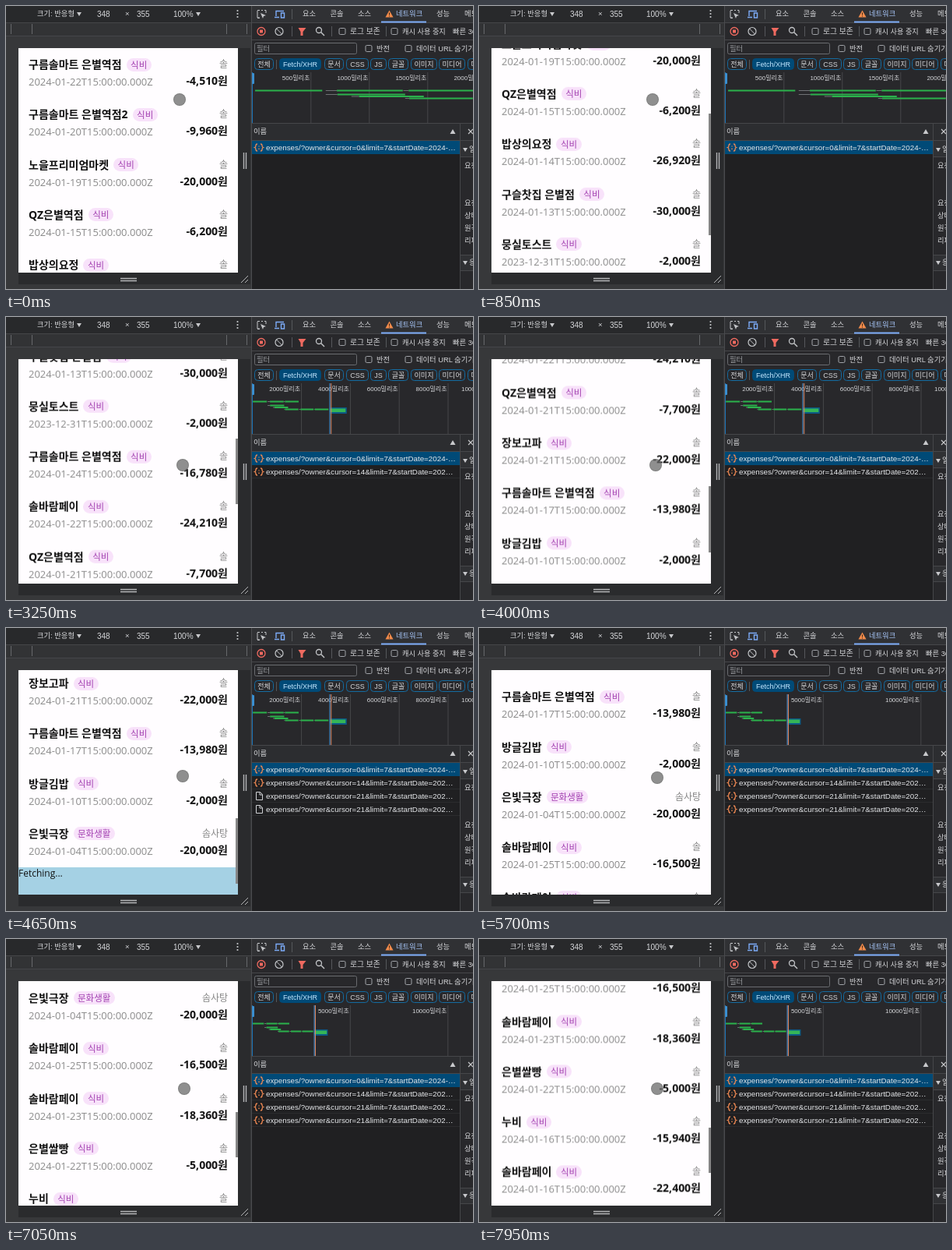
Recreate the animation shown at these times as an HTML page. Size 600x363 px, loop 8 s.

```html
<!DOCTYPE html>
<html lang="ko">
<head>
<meta charset="utf-8">
<title>Expense list</title>
<style>
html, body { margin: 0; width: 100%; height: 100%; overflow: hidden; background: #28282a; }
#stage { position: relative; width: 600px; height: 363px; overflow: hidden; }
svg { position: absolute; inset: 0; }
svg text { font-family: "Liberation Sans", "Noto Sans CJK KR", "Noto Sans CJK JP", sans-serif; white-space: pre; }
#page { position: absolute; left: 16px; top: 54px; width: 282px; height: 288px; overflow: hidden;
  background: #fffdff; font: 13px/20px "Open Sans", "Noto Sans CJK KR", "Noto Sans CJK JP", sans-serif; }
#list { position: absolute; inset: 0; will-change: transform; }
.item { position: absolute; left: 13px; width: 256px; height: 64px; white-space: nowrap; }
.item > * { position: absolute; }
.name { left: 0; top: 11px; display: flex; align-items: center; font-size: 14px; font-weight: 700; color: #111; }
.tag { margin-left: 6px; padding: 0 5.5px; border-radius: 9px; background: #f8e2fa;
  font-size: 11.5px; line-height: 17px; font-weight: 400; color: #a23fb0; }
.owner { right: 0; top: 11px; font-size: 12px; color: #858585; }
.date { left: 0; top: 33px; color: #8a8a8a; }
.sum { right: 0; top: 32px; font-size: 14px; font-weight: 700; color: #111; }
#more { position: absolute; left: 0; width: 282px; height: 82px; background: #a5d1e4; color: #111;
  font-size: 12px; line-height: 15px; }
#thumb { position: absolute; right: 0; width: 3.5px; background: #858585; }
#cursor { position: absolute; left: -8px; top: -8px; width: 16px; height: 16px; border-radius: 50%;
  box-sizing: border-box; background: rgba(105,105,105,.74); border: 1px solid rgba(95,95,95,.35); }
</style>
</head>
<body>
<div id="stage">
  <svg id="chrome" width="600" height="363"></svg>
  <div id="page"><div id="list"><div id="more">Fetching...</div></div><div id="thumb"></div></div>
  <div id="cursor"></div>
</div>
<script>
const LOOP = 8000, ROW = 64.3, VIEW = 288, FOOT = 82;
const byId = id => document.getElementById(id);
const chrome = byId('chrome');

// SVG helpers
function add(tag, attrs, parent = chrome) {
  const el = document.createElementNS('http://www.w3.org/2000/svg', tag);
  for (const key in attrs) el.setAttribute(key, attrs[key]);
  return parent.appendChild(el);
}
const group = () => add('g', {});
const rect = (x, y, width, height, fill, parent, more) => add('rect', { x, y, width, height, fill, ...more }, parent);
const line = (d, stroke, parent, width = 1) => add('path', { d, stroke, fill: 'none', 'stroke-width': width }, parent);
function text(x, cy, value, { size = 9.3, fill = '#d6d7da', anchor = 'start', parent } = {}) {
  add('text', { x, y: cy + size * .36, 'font-size': size, fill, 'text-anchor': anchor }, parent).textContent = value;
}
function checkbox(x, y, label, size) {
  rect(x - 4, y - 4, 8, 8, 'none', chrome, { rx: 1.5, stroke: '#a0a3a8' });
  text(x + 10, y, label, { size });
}
const arrow = (x, y) => add('path', { d: `M${x - 3} ${y - 2}h6l-3 5z`, fill: '#c8c9cc' });

function drawDevice() {
  rect(0, 0, 315, 363, '#37383a');
  rect(0, 0, 315, 21, '#28292b');
  rect(0, 21, 315, 17, '#323335');
  line('M0 21.5H315M0 38.5H315', '#454649');
  line('M6.5 23V36M33.5 23V36M283.5 23V36M309.5 23V36', '#66686b');
  rect(16, 342, 298, 15, '#2a2b2d');
  rect(298, 54, 16, 303, '#2a2b2d');
  line('M305.5 188V209M308.5 188V209M147 349.5H168M147 352.5H168', '#b5b6b8', chrome, 1.4);
  line('M302 355L311 346M307 355L311 351', '#b5b6b8');
  text(40, 10, '크기: 반응형');
  arrow(94, 10);
  text(117, 10, '348', { size: 10 });
  text(153, 10, '×', { size: 9.5 });
  text(168, 10, '355', { size: 10 });
  text(215, 10, '100%', { size: 10 });
  arrow(247, 10);
  for (const y of [6, 10, 14]) add('circle', { cx: 297.5, cy: y, r: 1.1, fill: '#c8c9cc' });
}

function drawTools() {
  rect(315, 0, 285, 363, '#28282b');
  rect(315, 0, 285, 21, '#303134');
  rect(315, 0, 1, 363, '#4a4b4e');
  line('M316 21.5H600M316 43.5H600M316 150.5H600', '#46474a');
  line('M367.5 4V17M367.5 26V39M418.5 26V39M488.5 26V39M347.5 69V81', '#55575b');

  // tab bar
  line('M326 15h-3V6M323 5.500h3M328 5.500h2M332 5.500h2V9M323 15.500h3', '#c3c5c8');
  add('path', { d: 'M327 9l7 3-3 1-1 3z', fill: '#c3c5c8' });
  line('M347 13V6.500H357M345 14.500H351M353.500 9h4v6h-4z', '#7cacf8', chrome, 1.4);
  ['요소', '콘솔', '소스'].forEach((name, i) => text(381 + 35.5 * i, 10, name));
  add('path', { d: 'M492.500 5.500l5 9h-10z', fill: '#f28b4b' });
  line('M492.500 8.500v3M492.500 12.500v1', '#3a2414');
  text(501, 10, '네트워크', { fill: '#a8c7fa' });
  rect(482, 19.5, 58, 2, '#7cacf8');
  text(553, 10, '성능');
  text(589, 10, '메모리');

  // recording bar
  add('circle', { cx: 328, cy: 32.5, r: 5, fill: 'none', stroke: '#ef6a60', 'stroke-width': 1.3 });
  rect(326, 30.5, 4, 4, '#ef6a60');
  add('circle', { cx: 351, cy: 32.5, r: 5, fill: 'none', stroke: '#c3c5c8', 'stroke-width': 1.2 });
  line('M347.500 29L354.500 36', '#c3c5c8');
  add('path', { d: 'M375.500 28h10l-4 5v5h-3v-5z', fill: '#ef6a60' });
  add('circle', { cx: 402, cy: 31, r: 3.5, fill: 'none', stroke: '#c3c5c8', 'stroke-width': 1.3 });
  line('M404.500 33.500l4.500 4.500', '#c3c5c8', chrome, 1.4);
  checkbox(432, 32.5, '로그 보존', 9.8);
  checkbox(499, 32.5, '캐시 사용 중지', 9.2);
  text(574, 32.5, '빠른 3G');

  // filter bar
  rect(319.5, 47.5, 131, 14, '#28282b', chrome, { rx: 2, stroke: '#6a6c70' });
  text(322, 54.5, '필터', { fill: '#96989c' });
  checkbox(466, 54.5, '반전');
  checkbox(517, 54.5, '데이터 URL 숨기기');
  const chips = [['전체', 319, 25], ['Fetch/XHR', 351, 54], ['문서', 409, 25], ['CSS', 437, 29], ['JS', 468, 21],
    ['글꼴', 491, 26], ['이미지', 520, 34], ['미디어', 556, 34], ['매니페스트', 593, 50]];
  chips.forEach(([name, x, width], i) => {
    rect(x + .5, 67.5, width - 1, 14, i === 1 ? '#004a77' : 'none', chrome, { rx: 4, stroke: i === 1 ? '#004a77' : '#146ba0' });
    text(x + width / 2, 74.5, name, { size: 9, fill: i === 1 ? '#c2e7ff' : '#d6d7da', anchor: 'middle' });
  });

  // request table and details
  rect(316, 151, 284, 212, '#202022');
  rect(316, 151, 284, 21, '#2c2d30');
  line('M316 172.500H600M583.500 151V363', '#46474a');
  text(318, 161, '이름');
  add('path', { d: 'M570.500 164l3.500-6 3.500 6z', fill: '#c8c9cc' });
  rect(584, 173, 16, 190, '#28282b');
  line('M594 158l6 6M600 158l-6 6', '#c8c9cc', chrome, 1.2);
  rect(584, 173, 16, 20, '#303134');
  rect(584, 319, 16, 20, '#303134');
  line('M584 193.500H600M584 319.500H600M584 339.500H600', '#46474a');
  arrow(590, 184);
  arrow(590, 329);
  text(595, 184, '일반');
  text(595, 329, '응답 헤더');
  [[205, '요청 URL:'], [253, '요청 메서드:'], [269, '상태 코드:'], [285, '원격 주소:'], [301, '리퍼러 정책:']]
    .forEach(([y, label]) => text(589, y, label));
}

// Request overview: [y, waiting from, start, end] in ms
const REQUESTS = [[108.5, 25, 25, 600], [108.5, 630, 725, 1290], [108.5, 1295, 1340, 1900], [113.5, 630, 730, 1310],
  [116, 850, 915, 1470], [118.5, 1310, 1345, 1890], [118.5, 1920, 1980, 2510], [118.5, 2530, 2560, 3120]];
function drawOverview(scale, step) {
  const g = group();
  const at = ms => 316.3 + ms * scale;
  for (let ms = step; at(ms) < 660; ms += step) {
    rect(at(ms), 85, 1, 65, '#46474a', g);
    text(at(ms) - 1, 92, ms + '밀리초', { size: 8, anchor: 'end', parent: g });
  }
  for (const [y, wait, start, end] of REQUESTS) {
    rect(at(wait), y - .5, at(start) - at(wait), 1, '#707276', g);
    rect(at(start), y - 1, at(end) - at(start), 2, '#2bb24c', g);
  }
  rect(at(3190), 116, 680 * scale, 8, '#0b5a86', g);
  rect(at(3190), 117.5, 630 * scale, 4.5, '#35b558', g);
  rect(at(3160), 85, 1, 65, '#4f9be0', g);
  rect(at(3215), 85, 1, 65, '#d9825b', g);
  rect(316, 85, 1, 65, '#1a73b8', g);
  rect(316, 86, 3, 14, '#3b8fd0', g, { rx: 1 });
  return g;
}

function drawRequest(index, query) {
  const g = group(), y = 181.5 + 17 * index;
  rect(316, y - 8.5, 267, 17, index ? '#202022' : '#004a77', g);
  if (index) line(`M316 ${y + 8}H583`, '#2b2c2e', g);
  text(334, y, 'expenses/?owner&' + query + '…', { size: 9.8, fill: '#e6e8eb', parent: g });
  const pending = add('g', {}, g), done = add('g', {}, g);
  line(`M321.500 ${y - 5}h5l3 3v7h-8zM326 ${y - 5}v3.500h3.500`, '#d0d2d5', pending);
  line(`M323 ${y - 4.5}q-2 0-2 2t-1.500 2.500q1.500 .500 1.500 2.500t2 2M327 ${y - 4.5}q2 0 2 2t1.500 2.500q-1.500 .500-1.500 2.500t-2 2M325 ${y - 2}v1M325 ${y + 1}v1.500`,
    '#f28b54', done, 1.3);
  return { g, pending, done };
}

const MART = '구름솔마트 은별역점', PAY = '솔바람페이', STORE = 'QZ은별역점';
const EXPENSES = [
  [MART, '24-01-22', '4,510'], [MART + '2', '24-01-20', '9,960'], ['노을프리미엄마켓', '24-01-19', '20,000'],
  [STORE, '24-01-15', '6,200'], ['밥상의요정', '24-01-14', '26,920'], ['구슬찻집 은별점', '24-01-13', '30,000'],
  ['뭉실토스트', '23-12-31', '2,000'], [MART, '24-01-24', '16,780'], [PAY, '24-01-22', '24,210'],
  [STORE, '24-01-21', '7,700'], ['장보고파', '24-01-21', '22,000'], [MART, '24-01-17', '13,980'],
  ['방글김밥', '24-01-10', '2,000'], ['은빛극장', '24-01-04', '20,000', '문화생활', '솜사탕'],
  [PAY, '24-01-25', '16,500'], [PAY, '24-01-23', '18,360'], ['은별쌀빵', '24-01-22', '5,000'],
  ['누비', '24-01-16', '15,940'], [PAY, '24-01-16', '22,400'], [MART, '24-01-15', '8,300'], [STORE, '24-01-12', '3,600']
];
const items = EXPENSES.map(([name, date, sum, tag = '식비', owner = '솔'], i) => {
  const el = document.createElement('div');
  el.className = 'item';
  el.style.top = i * ROW + 'px';
  el.innerHTML = `<div class="name">${name}<span class="tag">${tag}</span></div><div class="owner">${owner}</div>
    <div class="date">20${date}T15:00:00.000Z</div><div class="sum">-${sum}원</div>`;
  return byId('list').appendChild(el);
});

// Monotone cubic through [time, value] points
function curve(points) {
  const slope = i => (points[i + 1][1] - points[i][1]) / (points[i + 1][0] - points[i][0]);
  const tangent = points.map((_, i) => {
    if (i === 0 || i === points.length - 1) return 0;
    const a = slope(i - 1), b = slope(i);
    return a * b > 0 ? 2 * a * b / (a + b) : 0;
  });
  tangent[points.length - 1] = slope(points.length - 2);
  return t => {
    let i = 0;
    while (i < points.length - 2 && t > points[i + 1][0]) i++;
    const [t0, v0] = points[i], [t1, v1] = points[i + 1], h = t1 - t0, u = (t - t0) / h;
    return v0 * (1 + 2 * u) * (1 - u) ** 2 + v1 * u * u * (3 - 2 * u)
      + h * u * (1 - u) * (tangent[i] * (1 - u) - tangent[i + 1] * u);
  };
}
const scrollAt = curve([[0, 0], [100, 0], [880, 162], [1200, 244], [2600, 244], [3250, 346], [4270, 612],
  [4650, 647], [4950, 694], [6050, 694], [7050, 835], [8000, 939]]);
const cursorX = curve([[0, 223], [1800, 223], [2500, 227], [5000, 227], [5300, 229], [8000, 229]]);
const cursorY = curve([[0, 120], [1800, 120], [2500, 190], [5000, 190], [5300, 192], [8000, 192]]);

const SCROLLING = [[100, 1200], [2600, 4950], [6050, LOOP]];
function thumbOpacity(t) {
  const last = SCROLLING.filter(([start]) => t > start).pop();
  return last ? Math.min(1, Math.max(0, (last[1] + 550 - t) / 250)) : 0;
}

drawDevice();
drawTools();
const overviews = [drawOverview(.15, 500), drawOverview(.0314, 2000), drawOverview(.0251, 5000)];
const LOADED = [1450, 5300];
const requests = [['cursor=0&limit=7&startDate=2024-', 0, 0], ['cursor=14&limit=7&startDate=202', 920, LOADED[0]],
  ['cursor=21&limit=7&startDate=202', 4300, LOADED[1]], ['cursor=21&limit=7&startDate=202', 4300, LOADED[1]]]
  .map(([query, sent, done], i) => ({ sent, finished: done, ...drawRequest(i, query) }));
const show = (el, on) => el.setAttribute('visibility', on ? 'inherit' : 'hidden');

function render(t) {
  const count = 7 * (1 + LOADED.filter(ms => t >= ms).length);
  const scroll = scrollAt(t), content = count * ROW + FOOT;
  byId('list').style.transform = `translateY(${-scroll}px)`;
  byId('more').style.top = count * ROW + 'px';
  items.forEach((el, i) => el.style.visibility = i < count ? 'visible' : 'hidden');

  const thumb = byId('thumb').style;
  thumb.top = scroll * VIEW / content + 'px';
  thumb.height = VIEW * VIEW / content + 'px';
  thumb.opacity = thumbOpacity(t);
  byId('cursor').style.transform = `translate(${cursorX(t)}px, ${cursorY(t)}px)`;

  const zoom = t < 920 ? 0 : t < LOADED[1] ? 1 : 2;
  overviews.forEach((g, i) => show(g, i === zoom));
  for (const { g, pending, done, sent, finished } of requests) {
    show(g, t >= sent);
    g.style.display = t >= sent ? '' : 'none';
    show(pending, t < finished);
    show(done, t >= finished);
  }
}

const began = performance.now();
function tick() {
  render((performance.now() - began) % LOOP);
  requestAnimationFrame(tick);
}
render(0);
requestAnimationFrame(tick);
</script>
</body>
</html>
```
